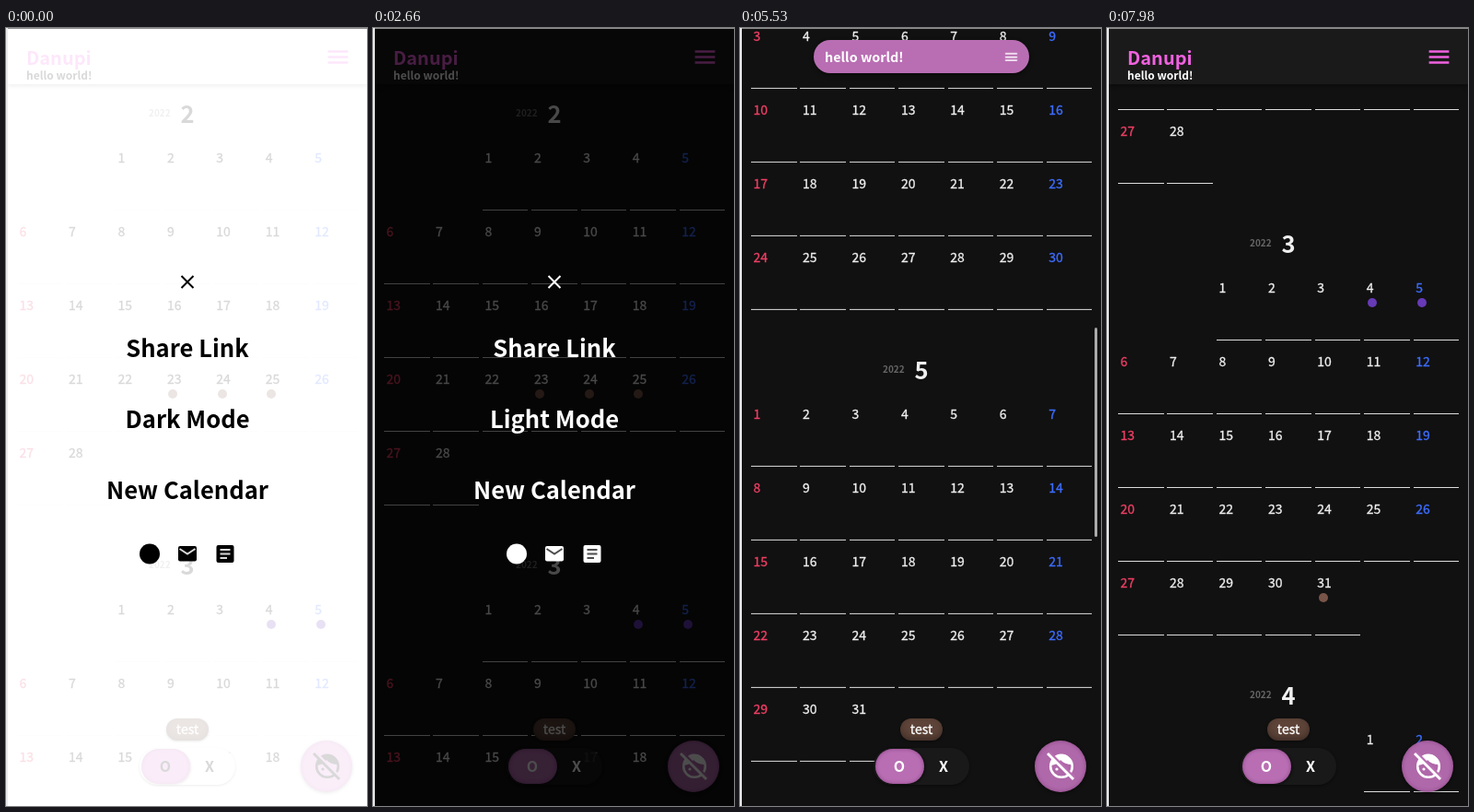
These frames come from a looping animation (392 px wide and 844 px high, 8 s). An HTML page:

```html
<!DOCTYPE html>
<html lang="en">
<head>
<meta charset="utf-8">
<title>Calendar</title>
<style>
@property --s { syntax: "<number>"; inherits: true; initial-value: 0; }
@property --bg { syntax: "<color>"; inherits: true; initial-value: #fff; }
@property --ink { syntax: "<color>"; inherits: true; initial-value: #000; }
@property --line { syntax: "<color>"; inherits: true; initial-value: #eee; }
@property --year { syntax: "<color>"; inherits: true; initial-value: #999; }
@property --sun { syntax: "<color>"; inherits: true; initial-value: #e0305a; }
@property --sat { syntax: "<color>"; inherits: true; initial-value: #3d6dff; }
@property --head { syntax: "<color>"; inherits: true; initial-value: #fff; }
@property --band { syntax: "<color>"; inherits: true; initial-value: #fff; }
@property --face { syntax: "<color>"; inherits: true; initial-value: #000; }
@property --pill { syntax: "<color>"; inherits: true; initial-value: #fff; }
@property --knob { syntax: "<color>"; inherits: true; initial-value: #dc86d6; }
@property --fab { syntax: "<color>"; inherits: true; initial-value: #dc86d6; }
@property --chip { syntax: "<color>"; inherits: true; initial-value: #795548; }
@property --veil { syntax: "<color>"; inherits: true; initial-value: #fff; }
@property --menu { syntax: "<color>"; inherits: true; initial-value: #000; }

html, body { margin: 0; width: 100%; height: 100%; overflow: hidden; background: #fff; }
#stage, #stage * { animation-duration: 8s; animation-timing-function: linear; animation-iteration-count: infinite; }
#stage {
  position: relative; width: 392px; height: 844px; overflow: hidden;
  font-family: "Noto Sans CJK KR", "Noto Sans CJK JP", "Noto Sans CJK SC", "Noto Sans CJK", "Noto Sans", sans-serif;
  background: var(--bg); color: var(--ink);
  animation-name: theme, scroll;
}
#stage div, #stage svg { position: absolute; }
/* cap-height centre sits on "top" */
.t { line-height: 1; margin-top: -.57em; white-space: nowrap; }
.mid { left: 197px; transform: translateX(-50%); }
.bold { font-weight: 700; }
.medium { font-size: 14px; font-weight: 500; -webkit-text-stroke: .3px currentColor; }

#days { inset: 0; transform: translateY(calc(var(--s) * -1px)); }
.num { left: 197px; font-size: 25.6px; transform: translateX(-50%); }
.year { left: 155px; font-size: 10px; color: var(--year); }
.sun { color: var(--sun); }
.sat { color: var(--sat); }
.rule { width: 49.6px; height: 1px; background: var(--line); }
.dot { width: 10px; height: 10px; margin: -5px; border-radius: 50%; }

#thumb {
  left: 385px; top: 4px; width: 3px; border-radius: 2px; background: #aaa;
  transform: translateY(calc(var(--s) * var(--k) * 1px)); animation-name: thumb;
}
#head {
  background: linear-gradient(var(--head) 36px, var(--band) 0);
  box-shadow: 0 2px 5px rgba(0,0,0,.42); animation-name: head;
}
#name { color: #f062e0; animation-name: name; }
#hello { color: var(--face); animation-name: hello; }
#burger { width: 29px; height: 29px; margin: -14.5px; fill: currentColor; animation-name: burger; }

#chip {
  left: 174px; top: 749px; width: 46px; height: 24px; border-radius: 12px; background: var(--chip);
  box-shadow: inset 0 -3px 6px rgba(0,0,0,.3), 0 1px 3px rgba(0,0,0,.5);
}
#toggle { left: 145px; top: 781px; width: 104px; height: 40px; border-radius: 20px; background: var(--pill); box-shadow: 0 1px 3px rgba(0,0,0,.45); }
#knob { left: 147px; top: 782px; width: 53px; height: 38px; border-radius: 19px; background: var(--knob); box-shadow: inset 0 0 4px rgba(70,10,70,.4), 1px 1px 3px rgba(0,0,0,.4); }
#fab { left: 320px; top: 773px; width: 56px; height: 56px; border-radius: 50%; background: var(--fab); opacity: .95; box-shadow: inset 0 0 4px rgba(70,10,70,.35), 0 1px 4px rgba(0,0,0,.5); }
#face { left: 332px; top: 785px; width: 32px; height: 32px; color: var(--face); }

#veil { inset: 0; background: var(--veil); color: var(--menu); animation-name: close; }
#veil .t { font-size: 25.6px; }
#veil svg { left: 0; top: 0; width: 392px; height: 844px; }
#toDark { animation-name: before; }
#toLight { animation-name: after; }
#left { left: 0; top: 0; width: 2px; height: 844px; background: #eaeaea; }
#top { left: 0; top: 0; width: 392px; height: 1px; background: #8c8c8c; }

@keyframes theme {
  0%, 27.99% {
    --bg: #fff; --ink: #000; --line: #eee; --year: #999; --sun: #e0305a; --sat: #3d6dff; --head: #fff; --band: #fff;
    --face: #000; --pill: #fff; --knob: #dc86d6; --fab: #dc86d6; --chip: #795548; --veil: rgba(255,255,255,.85); --menu: #000;
  }
  28%, 28.7% {
    --bg: #cfcfcf; --ink: #b8b8b8; --line: #b8b8b8; --year: #c4c4c4; --sun: #ff3060; --sat: #3d6dff; --head: #000; --band: #6c6c6c;
    --face: #fff; --pill: #1a1a1a; --knob: #c070ba; --fab: #f5aef0; --chip: #8d6e63; --veil: rgba(0,0,0,.65); --menu: #fff;
  }
  33.25%, 53.37% {
    --bg: #111; --ink: #f0f0f0; --line: #ddd; --year: #666; --sun: #ee3f64; --sat: #3d6dff; --head: #1a1a1a; --band: #1a1a1a;
    --face: #fff; --pill: rgba(27,27,27,.88); --knob: #b96eb3; --fab: #b96eb3; --chip: #5d4338; --veil: rgba(0,0,0,.7); --menu: #fff;
  }
  56.87%, 78.75% { --head: #b96eb3; --band: #b96eb3; }
  79.4%, 100% {
    --bg: #111; --ink: #f0f0f0; --line: #ddd; --year: #666; --sun: #ee3f64; --sat: #3d6dff; --head: #1a1a1a; --band: #1a1a1a;
    --face: #fff; --pill: rgba(27,27,27,.88); --knob: #b96eb3; --fab: #b96eb3; --chip: #5d4338; --veil: rgba(0,0,0,.7); --menu: #fff;
  }
}
@keyframes scroll {
  0%, 50.75% { --s: 0; }
  51.625% { --s: 9; }
  52.5% { --s: 90; }
  53.375% { --s: 220; }
  55.125% { --s: 470; }
  56.875% { --s: 640; }
  59.5% { --s: 790; }
  62.125% { --s: 860; }
  63.875% { --s: 940; }
  65.625% { --s: 1060; }
  67.375% { --s: 1148; }
  69.125% { --s: 1192; }
  71.75% { --s: 1216; }
  76.125% { --s: 1225; }
  77% { --s: 1208; }
  77.875% { --s: 1140; }
  78.75% { --s: 1020; }
  79.625% { --s: 880; }
  80.5% { --s: 745; }
  82.25% { --s: 550; }
  84% { --s: 430; }
  85.75% { --s: 362; }
  86.625%, 100% { --s: 349; }
}
@keyframes thumb {
  0%, 51.6% { --k: .409; height: 345px; opacity: 0; }
  51.61%, 64.37% { --k: .409; height: 345px; opacity: 1; }
  64.38%, 88.4% { --k: .2693; height: 227px; opacity: 1; }
  93.6%, 100% { --k: .2693; height: 227px; opacity: 0; }
}
@keyframes head {
  0%, 53.37%, 82.25%, 100% { left: 2px; top: 0; width: 390px; height: 61px; border-radius: 0; }
  56.87%, 78.75% { left: 80px; top: 13px; width: 234px; height: 36px; border-radius: 18px; }
  79.625% { left: 71px; top: 11px; width: 254px; height: 40px; border-radius: 18px; }
}
@keyframes name {
  0%, 53.37%, 82.25%, 100% { left: 22px; top: 33px; font-size: 20px; opacity: 1; }
  56%, 78.75% { left: 92px; top: 15px; font-size: 12px; opacity: 0; }
  79.625% { left: 83px; top: 17px; font-size: 13px; opacity: .25; }
}
@keyframes hello {
  0%, 53.37%, 82.25%, 100% { left: 22px; top: 52px; font-size: 12px; }
  56.87%, 78.75% { left: 92px; top: 32px; font-size: 14.4px; }
  79.625% { left: 65px; top: 34px; font-size: 14.4px; }
}
@keyframes burger {
  0%, 53.37%, 82.25%, 100% { left: 360px; top: 31px; transform: none; color: #f062e0; }
  56.87%, 78.75% { left: 294.5px; top: 31px; transform: scale(.6); color: #fff; }
  79.625% { left: 303.5px; top: 31px; transform: scale(.64); color: #fff; }
}
@keyframes close { 0%, 42% { opacity: 1; } 46.375%, 100% { opacity: 0; } }
@keyframes before { 0%, 27.99% { opacity: 1; } 28%, 100% { opacity: 0; } }
@keyframes after { 0%, 27.99% { opacity: 0; } 28%, 100% { opacity: 1; } }
</style>
</head>
<body>
<div id="stage">
  <div id="days"></div>

  <div id="head"></div>
  <div id="name" class="t bold">Danupi</div>
  <div id="hello" class="t bold">hello world!</div>
  <svg id="burger" viewBox="0 0 24 24"><path d="M3 6h18v2H3zM3 11h18v2H3zM3 16h18v2H3z"/></svg>
  <div id="thumb"></div>

  <div id="chip"></div>
  <div class="t mid medium" style="top:761px;color:#fff">test</div>
  <div id="toggle"></div>
  <div id="knob"></div>
  <div class="t bold mid" style="left:173px;top:801px;font-size:16px;color:var(--face)">O</div>
  <div class="t bold mid" style="left:221px;top:801px;font-size:16px;color:var(--face)">X</div>
  <div id="fab"></div>
  <svg id="face" viewBox="-16 -16 32 32" fill="currentColor">
    <circle cx="1" r="11.8" fill="none" stroke="currentColor" stroke-width="2.6"/>
    <path d="M-11 -1Q-2 -2 0 -7Q4 -2 13 -2A12 12 0 0 0 -11 -1Z"/>
    <circle cx="-4" cy="3" r="1.6"/><circle cx="5.5" cy="3" r="1.6"/>
    <path d="M-12 -15L16 13" stroke="var(--fab)" stroke-width="3"/>
    <path d="M-14 -14L14 14" stroke="currentColor" stroke-width="2.8"/>
  </svg>

  <div id="veil">
    <div class="t bold mid" style="top:348px">Share Link</div>
    <div id="toDark" class="t bold mid" style="top:425px">Dark Mode</div>
    <div id="toLight" class="t bold mid" style="top:425px">Light Mode</div>
    <div class="t bold mid" style="top:502px">New Calendar</div>
    <svg viewBox="0 0 392 844" fill="currentColor">
      <path d="M190.5 269l13 13m0-13l-13 13" stroke="currentColor" stroke-width="2"/>
      <circle cx="156" cy="570.5" r="11"/>
      <rect x="187" y="562" width="20" height="16.5" rx="2"/>
      <rect x="228.5" y="561" width="19" height="19" rx="2"/>
      <g fill="none" stroke="var(--veil)" stroke-width="2">
        <path d="M188.5 565l8.5 5.5l8.5-5.5"/>
        <path d="M232.5 566h11m-11 4.5h11m-11 4.5h7.5"/>
      </g>
    </svg>
  </div>
  <div id="top"></div>
  <div id="left"></div>
</div>
<script>
const days = document.getElementById("days");
const BROWN = "#795548", VIOLET = "#673ab7";
const events = { "2-23": BROWN, "2-24": BROWN, "2-25": BROWN, "3-4": VIOLET, "3-5": VIOLET, "3-31": BROWN };

function add(className, top, left, text = "") {
  const el = document.createElement("div");
  el.className = className;
  el.style.top = top + "px";
  if (left !== undefined) el.style.left = left + "px";
  el.textContent = text;
  days.append(el);
  return el;
}

let y = 93;
for (let month = 2; month <= 7; month++) {
  const first = new Date(2022, month - 1, 1).getDay();
  const count = new Date(2022, month, 0).getDate();
  add("t bold year", y, undefined, 2022);
  add("t bold num", y + 1, undefined, month);
  for (let d = 1; d <= count; d++) {
    const slot = first + d - 1, col = slot % 7;
    const x = 10 + col * 374 / 7, top = y + 48 + Math.floor(slot / 7) * 80;
    add("t medium" + (col === 0 ? " sun" : col === 6 ? " sat" : ""), top, x + 4.6, d);
    add("rule", top + 56, x + 2);
    const color = events[month + "-" + d];
    if (color) add("dot", top + 15.5, x + 11.2).style.background = color;
  }
  y += 90 + 80 * Math.ceil((first + count) / 7);
}
</script>
</body>
</html>
```
